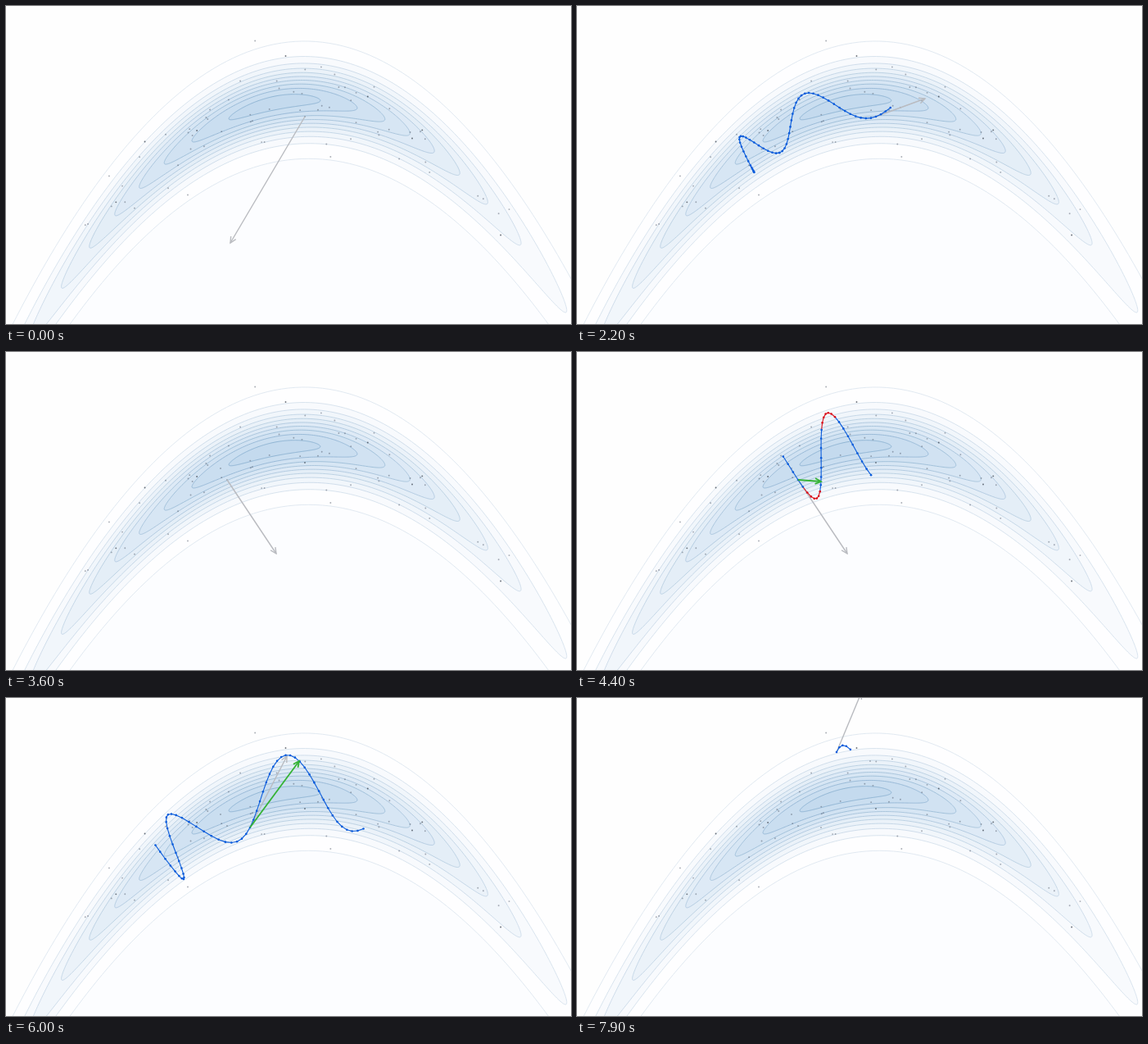
An HTML page with a canvas for the animation above (8 s loop, 690 by 388 pixels).

```html
<!DOCTYPE html>
<html lang="en">
<head>
<meta charset="utf-8">
<style>
  html, body { margin: 0; width: 100%; height: 100%; overflow: hidden; background: #fefefe; }
  canvas { display: block; width: 690px; height: 388px; }
</style>
</head>
<body>
<canvas id="stage" width="690" height="388"></canvas>
<script>
const W = 690, H = 388, LOOP = 8000, TICK = 100;
const BLUE = '#0b5cdb', RED = '#d9101c', GRAY = '#b9bbc0', GREEN = '#35b335', SPECK = 'rgba(70,80,95,.45)';
const ctx = document.getElementById('stage').getContext('2d');

// Banana density: a Gaussian bent along a parabola, in pixels.
const CX = 328, SX = 175.5, FLAT = 0.1497;
const ridge = u => 118.5 - 0.198 * u + 0.002542 * u * u;
const slope = u => -0.198 + 0.005084 * u;

const STIFF = 0.0543, DRAG_X = 0.82, PULL = 0.0015;

function force(x, y) {
  const u = x - CX, fy = -STIFF * (y - ridge(u));
  return [-DRAG_X * fy * slope(u) - PULL * u, fy];
}

function leap(s, dir) {
  const [ax, ay] = force(s.x, s.y);
  const vx = s.vx + dir * ax / 2, vy = s.vy + dir * ay / 2;
  const x = s.x + dir * vx, y = s.y + dir * vy;
  const [bx, by] = force(x, y);
  return { x, y, vx: vx + dir * bx / 2, vy: vy + dir * by / 2 };
}

// at: current sample; tip: end of the momentum arrow; runs: signed numbers of steps;
// cap: distance from the ridge beyond which points are rejected.
const moves = [
  { show: 0, grow: 400, at: [365, 135], tip: [274, 289], runs: [1, -7, 8] },
  { show: 900, grow: 1200, at: [365, 135], tip: [425, 113], runs: [3, -60] },
  { show: 2500, grow: 2800, at: [262, 142], tip: [178, 6], runs: [-1, 2, -12, 13], cap: 18 },
  { show: 3600, grow: 3800, at: [270, 156], tip: [330, 246], runs: [-3, 28], cap: 36.5 },
  { show: 4600, grow: 4900, at: [298, 158], tip: [343, 71], runs: [-5, 26, -27] },
  { show: 6300, grow: 6500, at: [358, 77], tip: [427, 179], runs: [-7, 8] },
  { show: 7100, grow: 7300, at: [317, 66], tip: [345, 78], runs: [-1, 2, -2] },
  { show: 7600, grow: 7900, at: [317, 66], tip: [347, -6], runs: [4] }
];

function trace({ at: [x, y], tip, runs, cap = Infinity }) {
  const start = { x, y, vx: (tip[0] - x) / 10, vy: (tip[1] - y) / 10 };
  const ends = { '1': start, '-1': start }, nodes = [];
  for (const run of runs) {
    const dir = Math.sign(run);
    for (let i = 0; i < Math.abs(run); i++) {
      const from = ends[dir], node = leap(from, dir);
      node.from = from;
      node.color = Math.abs(node.y - ridge(node.x - CX)) > cap ? RED : BLUE;
      nodes.push(ends[dir] = node);
    }
  }
  return nodes;
}

moves.forEach((m, i) => {
  m.nodes = trace(m);
  const next = moves[i + 1];
  if (next && String(next.at) !== String(m.at)) m.next = next.at;
});

function dot(c, x, y, r, color) {
  c.fillStyle = color;
  c.beginPath();
  c.arc(x, y, r, 0, 7);
  c.fill();
}

function line(x1, y1, x2, y2, color, width) {
  ctx.strokeStyle = color;
  ctx.lineWidth = width;
  ctx.beginPath();
  ctx.moveTo(x1, y1);
  ctx.lineTo(x2, y2);
  ctx.stroke();
}

function arrow([x1, y1], [x2, y2], color, width) {
  line(x1, y1, x2, y2, color, width);
  const a = Math.atan2(y2 - y1, x2 - x1);
  ctx.beginPath();
  for (const [r, s] of [[8, -0.45], [0, 0], [8, 0.45]]) {
    ctx.lineTo(x2 - r * Math.cos(a + s), y2 - r * Math.sin(a + s));
  }
  ctx.stroke();
}

const mix = (from, to, f) => `rgb(${from.map((v, i) => Math.round(v + (to[i] - v) * f))})`;

function randomFrom(seed) {
  return () => (seed = seed * 16807 % 2147483647) / 2147483647;
}

function contour(c, w) {
  c.beginPath();
  for (let i = 0; i < 360; i++) {
    const a = i * Math.PI / 180, u = w * Math.cos(a);
    c.lineTo(CX + u, ridge(u) + w * FLAT * Math.sin(a));
  }
  c.closePath();
}

function scatter(c, count) {
  const rnd = randomFrom(2718);
  for (let i = 0; i < count; i++) {
    const r = SX * Math.sqrt(-2 * Math.log(rnd())), a = 2 * Math.PI * rnd();
    const u = r * Math.cos(a), y = ridge(u) + r * FLAT * Math.sin(a);
    if (y < 310) dot(c, CX + u, y, 0.95, i % 9 ? SPECK : 'rgba(50,58,70,.7)');
  }
}

function paintBackdrop() {
  const layer = document.createElement('canvas');
  layer.width = W;
  layer.height = H;
  const c = layer.getContext('2d');
  c.fillStyle = '#fefefe';
  c.fillRect(0, 0, W, H);
  c.fillStyle = '#fcfdff';
  c.beginPath();
  for (let x = 0; x <= W; x += 5) c.lineTo(x, ridge(x - CX));
  c.lineTo(W, H + 60);
  c.lineTo(0, H + 60);
  c.fill();
  c.lineWidth = 0.85;
  for (let k = 0; k < 10; k++) {
    contour(c, SX * Math.sqrt(-2 * Math.log(0.0236 + 0.103 * k)));
    c.fillStyle = mix([254, 254, 255], [196, 218, 238], k / 9);
    c.fill();
    c.strokeStyle = mix([220, 230, 239], [133, 173, 206], k / 9);
    c.stroke();
  }
  scatter(c, 80);
  return layer;
}
const backdrop = paintBackdrop();

function draw(t) {
  ctx.drawImage(backdrop, 0, 0);
  const past = moves.filter(m => m.show <= t), m = past[past.length - 1];
  for (const { at } of past) dot(ctx, ...at, 0.95, SPECK);
  arrow(m.at, m.tip, GRAY, 1.4);
  if (t < m.grow) return;

  const count = 4 + 5 * Math.floor((t - m.grow) / TICK);
  const nodes = m.nodes.slice(0, count);
  for (const n of nodes) line(n.from.x, n.from.y, n.x, n.y, n.color, 1.1);
  dot(ctx, ...m.at, 1.3, BLUE);
  for (const n of nodes) dot(ctx, n.x, n.y, 1.3, n.color);
  if (m.next && count > m.nodes.length) arrow(m.at, m.next, GREEN, 1.8);
}

function tick() {
  draw(performance.now() % LOOP);
  requestAnimationFrame(tick);
}
tick();
</script>
</body>
</html>
```
